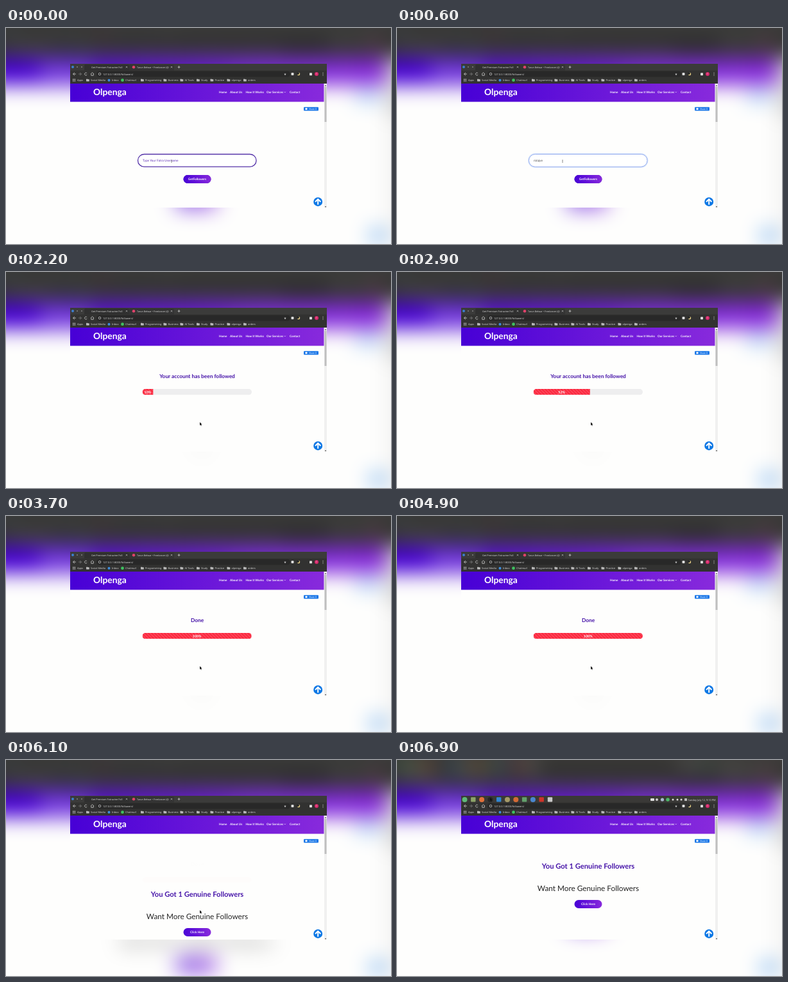
Recreate the animation shown at these times as an HTML page with a canvas. Size 600 px wide and 338 px high, loop 7000 ms.

```html
<!DOCTYPE html>
<html lang="en">
<head>
<meta charset="utf-8">
<title>Followers page demo</title>
<style>
html, body { margin: 0; width: 100%; height: 100%; overflow: hidden; background: #fefefd; }
canvas { display: block; width: 600px; height: 338px; }
</style>
</head>
<body>
<canvas id="stage" width="600" height="338"></canvas>
<script>
const LOOP = 7000, PAGE = '#fefefd', PURPLE = '#4512a8', PAD = 60;
const PAGE_FONT = 'Lato, sans-serif', UI_FONT = '"Noto Sans", sans-serif';
const USER = 'nirajvelon4417062';

const stage = document.getElementById('stage').getContext('2d');
const layer = (w, h) => Object.assign(document.createElement('canvas'), { width: w, height: h }).getContext('2d');
const g = layer(400, 225);                            // browser window
const wide = layer(600 + 2 * PAD, 338 + 2 * PAD);     // enlarged copy to blur
g.textRendering = 'geometricPrecision';

const clamp = x => Math.min(1, Math.max(0, x));
const progress = (t, from, to) => clamp((t - from) / (to - from));
const swing = p => 0.5 - Math.cos(p * Math.PI) / 2;
const mix = (a, b, p) => a + (b - a) * p;

function box(x, y, w, h, fill, r = 0) {
  g.beginPath();
  g.roundRect(x, y, w, h, r);
  g.fillStyle = fill;
  g.fill();
}
function dot(x, y, r, fill) {
  box(x - r, y - r, 2 * r, 2 * r, fill, r);
}
function line(points, color, width = 0.7) {
  g.beginPath();
  points.forEach(([x, y]) => g.lineTo(x, y));
  g.strokeStyle = color;
  g.lineWidth = width;
  g.stroke();
}
function text(str, x, y, size, color, weight = 400, align = 'left', family = PAGE_FONT) {
  g.font = `${weight} ${size}px ${family}`;
  g.textAlign = align;
  g.fillStyle = color;
  g.fillText(str, x, y);
}
const ui = (str, x, y, size = 3.9) => text(str, x, y, size, '#d4d4d4', 400, 'left', UI_FONT);

function gradient(x0, x1) {
  const fill = g.createLinearGradient(x0, 0, x1, 0);
  fill.addColorStop(0, '#4700d6');
  fill.addColorStop(1, '#882adc');
  return fill;
}
function button(label, y) {
  box(276.5, y, 43, 13, gradient(276, 320), 6.5);
  text(label, 298, y + 8.2, 4.8, '#fff', 700, 'center');
}
function cross(x, y, r) {
  line([[x - r, y - r], [x + r, y + r]], '#ccc', 0.6);
  line([[x - r, y + r], [x + r, y - r]], '#ccc', 0.6);
}

function tabStrip() {
  box(100, 56, 400, 11, '#3b3b3a');
  box(192, 57, 70, 9.5, '#343434', [2, 2, 0, 0]);
  box(122, 57, 70, 9.5, '#303030', [2, 2, 0, 0]);
  dot(104, 61, 2, '#3c7fd0');
  dot(111, 61, 0.9, '#8a8a8a');
  dot(118, 61, 0.9, '#8a8a8a');
  ui('Get Premium Fotravine Foll', 133, 62.8, 3.8);
  cross(188, 61.2, 1.2);
  dot(199, 61.2, 2.3, '#e0426b');
  ui('Tarun Belwar • Freelancer (@', 204, 62.8, 3.7);
  cross(258, 61.2, 1.2);
  line([[267.5, 61.2], [271.5, 61.2]], '#ddd');
  line([[269.5, 59.2], [269.5, 63.2]], '#ddd');
}

function systemPanel() {
  box(100, 56, 400, 11.5, '#3a3937');
  const apps = ['#5fb878', '#8da469', '#e0703a', '#262626', '#2f86d2', '#a59a68',
    '#d46a35', '#63a06c', '#4a86cf', '#cf3329', '#c9c9c9'];
  apps.forEach((color, i) => {
    const x = 105.5 + i * 13.3;
    if (i % 3 === 1 || i > 8) box(x - 3.7, 58.2, 7.4, 7.4, color, 1);
    else dot(x, 62, 4, color);
  });
  box(395, 60, 6, 4, '#ddd', 1);
  dot(405, 62, 2, '#ccc');
  dot(413.5, 62, 2.6, '#a9b8d0');
  dot(422, 62, 2.8, '#4cb86a');
  [430, 437, 443].forEach(x => dot(x, 62, 1.5, '#ddd'));
  box(448, 60, 4, 4, '#bbb', 0.5);
  ui('Sunday July 12, 9:10 PM', 453.5, 63.5, 3.9);
}

function toolbar() {
  box(100, 66.5, 400, 20.5, '#323231');
  box(141, 67.5, 302, 9, '#282828', 4.5);
  line([[107, 69.8], [104.5, 72], [107, 74.2]], '#ddd');
  line([[104.5, 72], [109, 72]], '#ddd');
  line([[115, 69.8], [117.5, 72], [115, 74.2]], '#888');
  line([[113, 72], [117.5, 72]], '#888');
  g.strokeStyle = '#ddd';
  g.beginPath();
  g.arc(124.5, 72, 2, 0.5, 5.6);
  g.stroke();
  line([[132, 72], [134.5, 69.7], [137, 72], [136.2, 72], [136.2, 74.3], [132.8, 74.3], [132.8, 72]], '#ddd');
  g.beginPath();
  g.arc(146, 72, 1.8, 0, 7);
  g.stroke();
  ui('127.0.0.1:8000/followers/', 151, 73.5, 4);
  text('★', 435, 73.8, 5, '#ccc', 400, 'center', '"DejaVu Sans", sans-serif');
  box(444.5, 70, 4, 4, '#ddd', 1);
  dot(456, 72, 2.2, '#f2d98a');
  dot(455, 71.2, 1.9, '#282828');
  box(473, 70.2, 4, 4, '#ddd', 0.6);
  dot(484, 72, 3, '#d8296c');
  text('T', 484, 73.2, 3, '#fff', 400, 'center');
  [70, 72, 74].forEach(y => dot(494, y, 0.6, '#ddd'));

  for (let i = 0; i < 9; i++) box(104 + i % 3 * 1.6, 79.5 + Math.floor(i / 3) * 1.6, 1, 1, '#ccc');
  ui('Apps', 111, 83.2);
  dot(160.5, 81.7, 2, '#3d8fe0');
  ui('Inbox', 165, 83.2);
  dot(181.5, 81.7, 2.4, '#3fc260');
  ui('Chatmurl', 186, 83.2);
  const folders = { 'Social Media': 125, Programming: 210, Business: 245.5, 'AI Tools': 271.5,
    Study: 297, Practice: 318.5, olpenga: 344.5, orders: 370 };
  for (const [name, x] of Object.entries(folders)) {
    box(x, 79.7, 2.4, 1.5, '#bbb', 0.4);
    box(x, 80.3, 4.8, 3.2, '#bbb', 0.4);
    ui(name, x + 7, 83.2);
  }
}

function pageFrame() {
  box(100, 87, 395.5, 28.5, gradient(100, 496));
  text('Olpenga', 136, 105, 13.8, '#fff', 700);
  const nav = { Home: 332, 'About Us': 349, 'How It Works': 373.5, 'Our Services': 406, Contact: 442 };
  for (const [name, x] of Object.entries(nav)) text(name, x, 102, 4.6, '#fff', 700);
  line([[433.5, 99.8], [434.7, 101], [435.9, 99.8]], '#fff', 0.6);

  box(464, 123.7, 23, 5.8, '#1977e8', 1);
  dot(468, 126.6, 1.7, '#fff');
  text('Share 0', 472, 127.9, 3.6, '#fff');

  dot(486.2, 271.9, 7, '#0d78e5');
  line([[486.2, 276.5], [486.2, 268]], '#fff', 2);
  line([[482, 272], [486.2, 267.8], [490.4, 272]], '#fff', 2);

  box(496, 87, 4, 194, '#f0f0f0');
  box(496.5, 92, 3, 55, '#bfbfbf');
  text('▴', 498, 91, 4, '#333', 400, 'center', '"DejaVu Sans", sans-serif');
  text('▾', 498, 280.5, 4, '#333', 400, 'center', '"DejaVu Sans", sans-serif');
}

function form(t) {
  const focused = t >= 300;
  const hover = progress(t, 1100, 1300);
  const typed = USER.slice(0, Math.round(USER.length * progress(t, 400, 900)));
  if (focused) box(204, 196, 187.5, 22.7, '#d9e6fc', 11.4);
  box(205.5, 197.5, 184.5, 19.7, '#fff', 9.8);
  g.strokeStyle = focused ? '#94acef' : '#5432a8';
  g.lineWidth = focused ? 1 : 1.3;
  g.stroke();
  if (typed) text(typed, 213, 209, 4.8, '#444');
  else text('Type Your Fotra Username', 213, 209, 4.8, '#5a2ab2');
  g.shadowColor = `rgba(0,0,0,${0.35 * hover})`;
  g.shadowBlur = 5;
  g.shadowOffsetY = 1.5;
  box(276.5, 230 - 1.5 * hover, 43, 13, PURPLE, 6.5);
  g.shadowColor = 'transparent';
  button('GetFollowers', 230 - 1.5 * hover);
}

function progressBar(t) {
  const p = progress(t, 2035, 3705), x = 212.5, y = 183, w = 170.5, h = 9.4;
  const label = t < 3600 ? 'Your account has been followed' : 'Done';
  text(label, 298, 166.4, 8.35, PURPLE, 700, 'center');
  g.save();
  g.beginPath();
  g.roundRect(x, y, w, h, h / 2);
  g.clip();
  box(x, y, w, h, '#eeeeef');
  g.beginPath();
  g.rect(x, y, w * p, h);
  g.clip();
  box(x, y, w, h, '#fb263d');
  const shift = 5 * (1 - t % 1000 / 1000);
  for (let s = x - 15 + shift; s < x + w + 5; s += 5) {
    line([[s, y], [s + h, y + h]], 'rgba(255,255,255,.15)', 1.7);
  }
  const percent = t >= 3600 ? 100 : Math.round(p * 100);
  text(percent + '%', x + w * p / 2, y + 6.6, 5.4, '#fff', 700, 'center');
  g.restore();
}

function results(y) {
  text('You Got 1 Genuine Followers', 298, y, 11.2, PURPLE, 700, 'center');
  text('Want More Genuine Followers', 298, y + 35.2, 11.8, '#222', 400, 'center');
  button('Click Here', y + 49);
}

function pointer(t) {
  const out = swing(progress(t, 900, 1250)), up = swing(progress(t, 6500, 6800));
  const x = mix(mix(258, 302, out), 145, up), y = mix(mix(206, 235, out), 59, up);
  if (out < 0.2) {
    line([[x, y], [x, y + 5]], '#333', 0.6);
    return;
  }
  g.beginPath();
  [[0, 0], [0, 5], [1.2, 4], [2, 5.8], [2.8, 5.4], [2, 3.7], [3.5, 3.6]].forEach(([dx, dy]) => g.lineTo(x + dx, y + dy));
  g.closePath();
  g.fillStyle = '#111';
  g.fill();
}

function drawWindow(t) {
  g.setTransform(1, 0, 0, 1, -100, -56);
  box(100, 56, 400, 225, PAGE);
  pageFrame();
  const formFade = swing(progress(t, 1620, 2030)), barFade = swing(progress(t, 5720, 6125));
  if (formFade < 1) {
    g.globalAlpha = 1 - formFade;
    form(t);
  } else if (barFade < 1) {
    g.globalAlpha = 1 - barFade;
    progressBar(t);
  }
  g.globalAlpha = barFade;
  if (barFade) results(barFade < 1 ? 214 : 170);
  g.globalAlpha = 1;
  tabStrip();
  if (t >= 6800) systemPanel();
  toolbar();
  pointer(t);
}

// Edge rows and columns are stretched outwards so the blur keeps its colour at the border.
function drawBackdrop() {
  const win = g.canvas;
  wide.fillStyle = PAGE;
  wide.fillRect(0, 0, wide.canvas.width, wide.canvas.height);
  wide.drawImage(win, 0, 0, 400, 1, 0, 0, wide.canvas.width, PAD);
  wide.drawImage(win, 0, 0, 1, 225, 0, PAD, PAD, 338);
  wide.drawImage(win, 399, 0, 1, 225, PAD + 600, PAD, PAD, 338);
  wide.drawImage(win, PAD, PAD, 600, 338);
  stage.filter = 'blur(16px)';
  stage.drawImage(wide.canvas, -PAD, -PAD);
  stage.filter = 'none';
}

let start;
function frame(now) {
  start ??= now;
  drawWindow((now - start) % LOOP);
  stage.fillStyle = PAGE;
  stage.fillRect(0, 0, 600, 338);
  drawBackdrop();
  stage.drawImage(g.canvas, 100, 56);
  requestAnimationFrame(frame);
}
requestAnimationFrame(frame);
</script>
</body>
</html>
```
